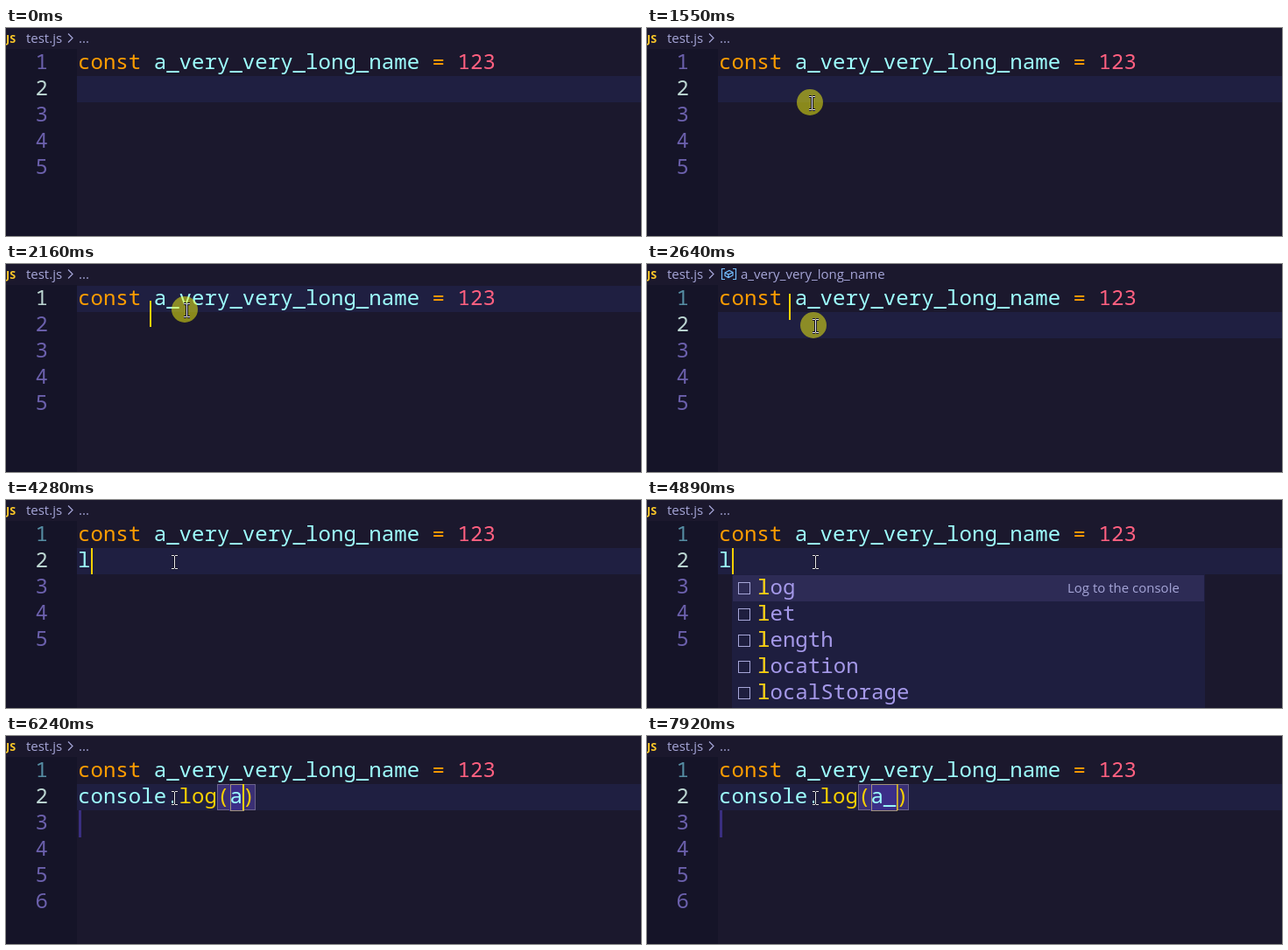
Write an HTML page with a canvas that moves like this. It is 725 by 238 pixels and loops after 7990 ms.

```html
<!DOCTYPE html>
<html lang="en">
<head>
<meta charset="utf-8">
<title>Editor snippet</title>
<style>
html, body { margin: 0; width: 100%; height: 100%; overflow: hidden; background: #1b182d; }
canvas { display: block; }
</style>
</head>
<body>
<canvas id="stage" width="725" height="238"></canvas>
<script>
const LOOP = 7990, PITCH = 14.45, LEFT = 82, TOP = 25, ROW = 30;
const CODE_FONT = '24.08px "Noto Sans Mono", monospace';
const UI_FONT = '15px "Open Sans", sans-serif';
const CYAN = '#9effff', ORANGE = '#ff9d00', YELLOW = '#fad000', PINK = '#ff6080', LAVENDER = '#a6a6d8';
const ctx = document.getElementById('stage').getContext('2d');

const clamp = (v, low = 0, high = 1) => Math.min(high, Math.max(low, v));
const mix = (a, b, k) => a + (b - a) * k;
const colX = col => LEFT + col * PITCH;
const rowTop = row => TOP + (row - 1) * ROW;

// The pointer arrives shortly before each press; the editor reacts shortly after it.
const ENTER = 920, SETTLE = 50, REACT = 30, PRESS = 130;
const clicks = [
  { at: 1540, travel: ENTER - 370, x: 188, y: 86 },
  { at: 2060, travel: 180, x: 206, y: 53 },
  { at: 2580, travel: 180, x: 192, y: 71 },
];
const typeL = 4280, accept = 5140, typeA = 6170, typeUnderscore = 7250;

// Every caret stop follows from a click or a key; only row 1 has text to click on.
const caretStops = [
  { at: -Infinity, row: 2, col: 0 },
  ...clicks.map(({ at, x, y }) => {
    const row = Math.floor((y - TOP) / ROW) + 1;
    return { at: at + REACT, row, col: row === 1 ? Math.floor((x - LEFT) / PITCH) : 0 };
  }),
  { at: typeL, row: 2, col: 1 },
  { at: accept, row: 2, col: 12 },
  { at: typeA, row: 2, col: 13 },
  { at: typeUnderscore, row: 2, col: 14 },
];
const stopIndex = t => caretStops.findLastIndex(stop => stop.at <= t);
const activeRow = t => caretStops[stopIndex(t)].row;

function rect(x, y, w, h, color) {
  ctx.fillStyle = color;
  ctx.fillRect(x, y, w, h);
}

function frame(x, y, w, h, color) {
  ctx.strokeStyle = color;
  ctx.lineWidth = 1;
  ctx.strokeRect(x + .5, y + .5, w - 1, h - 1);
}

function path(d, color, width = 1.2) {
  ctx.strokeStyle = color;
  ctx.lineWidth = width;
  ctx.stroke(new Path2D(d));
}

function text(value, x, y, color, font) {
  ctx.font = font;
  ctx.fillStyle = color;
  ctx.fillText(value, x, y);
}

function code(row, ...runs) {
  let col = 0;
  for (const [value, color] of runs) {
    text(value, colX(col), rowTop(row) + 22, color, CODE_FONT);
    col += value.length;
  }
}

function drawBreadcrumb(t) {
  text('JS', 0, 16.5, '#ffca28', 'bold 12.5px "Open Sans", sans-serif');
  text('test.js', 23, 17, LAVENDER, UI_FONT);
  path('M71 6.5l5 5-5 5', LAVENDER);
  // The symbol path lags behind the caret.
  if (activeRow(t - 170) !== 1) return text('...', 83, 17, LAVENDER, UI_FONT);
  path('M89 5.5h-3.5v12h3.5M98 5.5h3.5v12H98M89 10l5-2.5 4 2v3.5l-5 2.5-4-2zl4 2 5-2.5M93 12v3.5', '#75beff');
  text('a_very_very_long_name', 107, 17, LAVENDER, UI_FONT);
}

function drawNumbers(t) {
  const count = t < accept ? 5 : 6, active = activeRow(t);
  for (let row = 1; row <= count; row++) {
    const visited = row === 1 && stopIndex(t) > 2;
    const color = row === active ? '#bcd6d2' : visited ? '#558da3' : '#6b60ac';
    text(row, 33.5, rowTop(row) + 22, color, CODE_FONT);
  }
}

function drawSnippet(t) {
  const typed = t < typeA ? '' : t < typeUnderscore ? 'a' : 'a_';
  const left = Math.round(colX(12)), right = Math.round(colX(12 + typed.length)) + 1;
  rect(LEFT + 1, rowTop(3), 3, ROW + 1, '#3a2e80');
  if (t >= accept + 100) {
    for (const x of [left - 14, right - 1]) {
      rect(x, rowTop(2), 15, ROW, '#3a2f74');
      frame(x, rowTop(2), 15, ROW, '#6a628a');
    }
  }
  const width = Math.max(4, right - left);
  rect(left, rowTop(2), width, ROW + 1, '#3b2e88');
  if (typed) frame(left + 1, rowTop(2), width, ROW + 1, '#a2937a');
  code(2, ['console.', CYAN], ['log(', YELLOW], [typed, CYAN], [')', YELLOW]);
}

function drawSuggestions() {
  rect(97, 85, 540, 153, '#1e1e3f');
  rect(98, 86, 538, ROW, '#2d2b55');
  ['log', 'let', 'length', 'location', 'localStorage'].forEach((word, i) => {
    const y = 86 + i * ROW;
    frame(104, y + 8, 14, 14, LAVENDER);
    text(word, 126, y + 22, '#a599e9', CODE_FONT);
    text('l', 126, y + 22, YELLOW, CODE_FONT);
  });
  text('Log to the console', 480, 106, LAVENDER, UI_FONT);
}

function drawCaret(t) {
  const index = stopIndex(t);
  if (!index) return;
  const from = caretStops[index - 1], to = caretStops[index], age = t - to.at;
  // Single-column steps are instant, longer moves glide.
  const hop = from.row === to.row && to.col - from.col === 1;
  const k = hop ? 1 : clamp(age / 100);
  const x = mix(colX(from.col), colX(to.col), k) + .4;
  const y = mix(rowTop(from.row), rowTop(to.row), k);
  // Solid at first, then a soft blink.
  ctx.globalAlpha = clamp(.5 + 1.4 * Math.cos(Math.PI * Math.max(0, age - 380) / 610));
  rect(Math.round(x), Math.round(y), 2, ROW, YELLOW);
  ctx.globalAlpha = 1;
}

function drawPointer(t) {
  if (t < ENTER) return;
  let x = 375, y = 240;
  for (const click of clicks) {
    const k = clamp((t - click.at + SETTLE + click.travel) / click.travel);
    const eased = k * k * (3 - 2 * k);
    x = mix(x, click.x, eased);
    y = mix(y, click.y, eased);
  }
  x = Math.round(x);
  y = Math.round(y);
  if (clicks.some(({ at }) => t >= at && t < at + PRESS)) {
    ctx.beginPath();
    ctx.arc(x - 2, y - 1, 15, 0, 2 * Math.PI);
    ctx.fillStyle = 'rgba(255, 255, 10, .49)';
    ctx.fill();
  }
  const beam = `M${x + .5} ${y - 7}v14M${x - 3} ${y - 7.5}h3m1 0h3M${x - 3} ${y + 7.5}h3m1 0h3`;
  path(beam, '#15132a', 3);
  path(beam, '#e8e8e8', 1);
}

function draw(t) {
  rect(0, 0, 725, 238, '#1b182d');
  rect(0, 24, LEFT - 1, 214, '#151428');
  rect(LEFT - 1, rowTop(activeRow(t)), 644, ROW, '#1f1f41');
  drawBreadcrumb(t);
  drawNumbers(t);
  code(1, ['const ', ORANGE], ['a_very_very_long_name ', CYAN], ['= ', ORANGE], ['123', PINK]);
  if (t >= accept) drawSnippet(t);
  else if (t >= typeL) code(2, ['l', CYAN]);
  if (t >= typeL + 70 && t < accept) drawSuggestions();
  drawCaret(t);
  drawPointer(t);
}

const began = performance.now();
function tick() {
  draw((performance.now() - began) % LOOP);
  requestAnimationFrame(tick);
}
tick();
</script>
</body>
</html>
```
